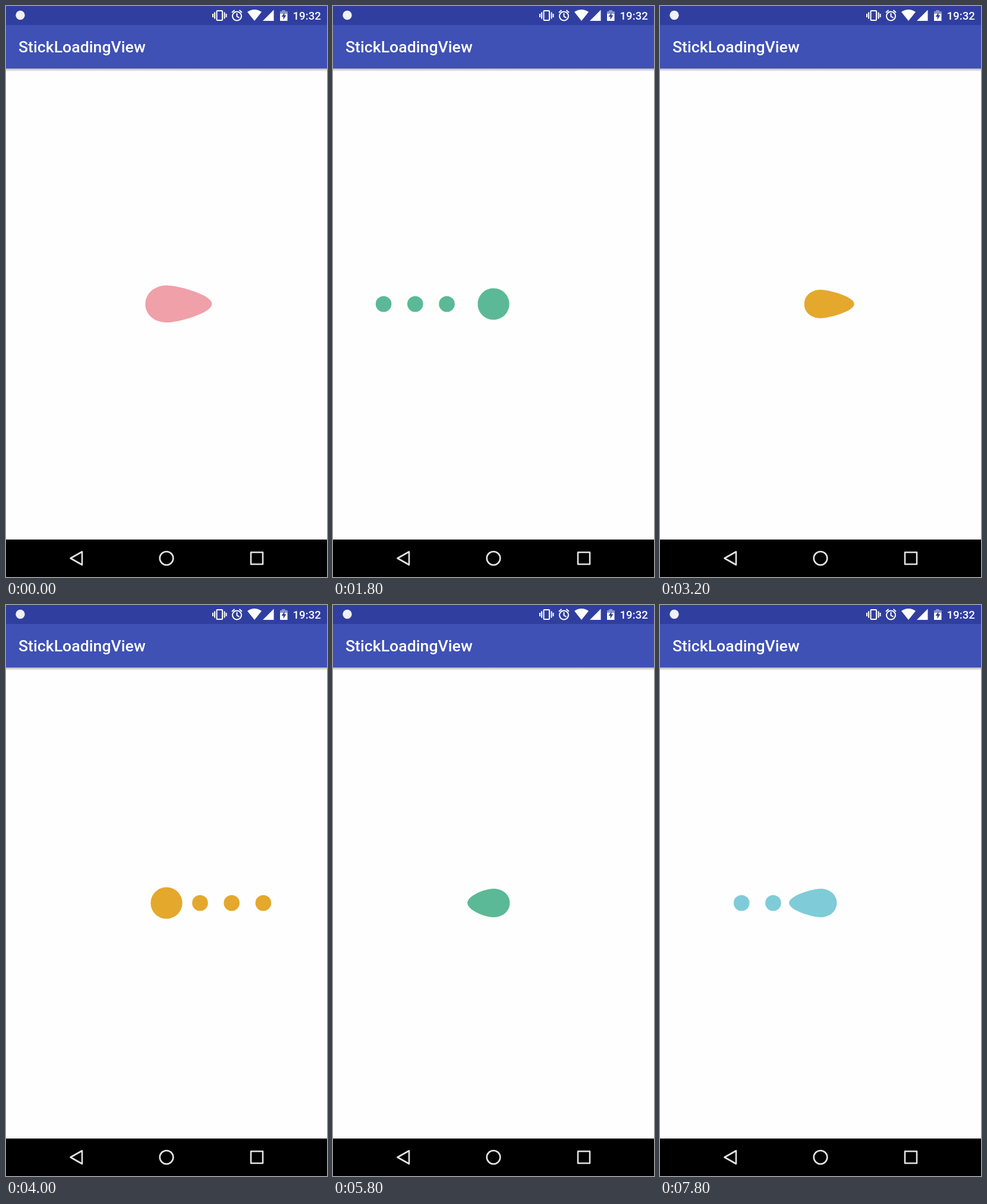
Write an HTML page that moves like this. It is 540x960 px and loops after 8000 ms.

```html
<!DOCTYPE html>
<html lang="en">
<head>
<meta charset="utf-8">
<title>StickLoadingView</title>
<style>
  html, body { margin: 0; width: 100%; height: 100%; overflow: hidden; background: #fefefe; }
  svg { display: block; width: 100%; height: 100%; }
  text { font-family: Roboto, sans-serif; font-weight: 500; fill: #fff; }
</style>
</head>
<body>
<svg viewBox="0 0 540 960">
  <defs>
    <linearGradient id="shade" x2="0" y2="1">
      <stop stop-color="#000" stop-opacity=".3"/>
      <stop offset="1" stop-color="#000" stop-opacity="0"/>
    </linearGradient>
  </defs>
  <rect width="540" height="960" fill="#fefefe"/>
  <rect y="105" width="540" height="5" fill="url(#shade)"/>
  <rect width="540" height="105" fill="#3f51b5"/>
  <rect width="540" height="32" fill="#303f9f"/>
  <text x="21" y="78" font-size="26.67">StickLoadingView</text>

  <!-- status bar -->
  <circle cx="24" cy="15.5" r="7.7" fill="#f0f0f5"/>
  <g fill="none" stroke="#fff" stroke-width="2">
    <rect x="354.5" y="8" width="9.5" height="16" rx="1"/>
    <path d="M351 10.500v11M348 13v6M367.500 10.500v11M370.500 13v6"/>
    <circle cx="388.500" cy="17" r="7.500"/>
    <path d="M388.500 12v5.500l4 2.300M380 11l4.500-4M397 11l-4.500-4"/>
  </g>
  <path d="M406 10Q418 2 430 10L418 25ZM432 25L450.500 6.500V25Z" fill="#fff"/>
  <path d="M461 9h3.500V7h5v2h4v16h-12.500Z" fill="#fff"/>
  <path d="M461 9h3.500V7h5v2h4v4h-12.500Z" fill="#303f9f" opacity=".55"/>
  <path d="M468.500 11l-5 7h3v5l5-7.500h-3Z" fill="#303f9f"/>
  <text x="482.5" y="22.8" font-size="18.67">19:32</text>

  <!-- navigation bar -->
  <rect y="897" width="540" height="63"/>
  <g fill="none" stroke="#e4e4e4" stroke-width="2.6" stroke-linejoin="round">
    <path d="M108.500 928.500L128 917.500V939.500Z"/>
    <circle cx="270" cy="928.500" r="11.300"/>
    <rect x="412" y="918.500" width="20" height="20"/>
  </g>

  <g id="loader">
    <path id="blob"/>
    <circle class="dot" r="13.3"/>
    <circle class="dot" r="13.3"/>
    <circle class="dot" r="13.3"/>
  </g>
</svg>
<script>
const LOOP = 8000, SIDE = 2700, START = 230, TOUCH = 2090;
const BASE = 26.6, GAP = 53.2, GROWTH = 4;
const SIDES = [
  { direction: -1, out: '#5bb998', back: '#7fcbd8' },
  { direction: 1, out: '#e4a82c', back: '#f0a0a8' }
];
// Distance of the leading dot from the centre, as [ms, px].
const TRAVEL = [[0, 0], [270, 30], [970, 150], [1450, 188], [2070, 145.5],
                [2170, 133], [2470, 50], [2700, 0]];

const loader = document.getElementById('loader');
const blob = document.getElementById('blob');
const dots = [...document.querySelectorAll('.dot')];
const clamp = v => Math.max(0, Math.min(1, v));

function slope(i) {
  const a = TRAVEL[Math.max(0, i - 1)], b = TRAVEL[Math.min(TRAVEL.length - 1, i + 1)];
  return (b[1] - a[1]) / (b[0] - a[0]);
}

function travel(time) {
  let i = 0;
  while (i < TRAVEL.length - 2 && time > TRAVEL[i + 1][0]) i++;
  const [t0, a] = TRAVEL[i], [t1, b] = TRAVEL[i + 1];
  const span = t1 - t0, u = (time - t0) / span, v = 1 - u;
  return a * (1 + 2 * u) * v * v + b * u * u * (3 - 2 * u)
    + span * u * v * (v * slope(i) - u * slope(i + 1));
}

// A circle of radius r whose right end is drawn out to x = tip.
function dropPath(r, tip) {
  const pull = clamp((tip - r) / 12);
  const top = r * (1 - 0.1 * pull), rear = r * (1 + 0.03 * pull);
  const handle = r * 0.552, nose = r * (0.552 - 0.1 * pull);
  return `M0 ${-top}C${handle} ${-top} ${tip} ${-nose} ${tip} 0
    C${tip} ${nose} ${handle} ${top} 0 ${top}
    C${-handle} ${top} ${-rear} ${handle} ${-rear} 0
    C${-rear} ${-handle} ${-handle} ${-top} 0 ${-top}Z`;
}

function draw(now) {
  const time = (now % LOOP - START + 2 * SIDE) % (2 * SIDE);
  const side = SIDES[Math.floor(time / SIDE)];
  const local = time % SIDE;
  const returning = local >= TOUCH;
  const sticky = returning || local < SIDE / 2;
  const lead = travel(local);

  let radius = BASE, tip = 0;
  if (!returning) radius += 3 * GROWTH * (1 - clamp(local / 150));
  dots.forEach((dot, i) => {
    const x = lead - i * GAP;
    const attached = sticky && x > 0 && x <= GAP;
    if (attached) tip = x + BASE;
    if (returning) radius += GROWTH * clamp(1 - x / 12);
    dot.setAttribute('cx', x);
    dot.style.display = x > 0 && !attached ? '' : 'none';
  });

  blob.setAttribute('d', dropPath(radius, Math.max(radius, tip)));
  loader.setAttribute('fill', returning ? side.back : side.out);
  loader.setAttribute('transform', `translate(270 501) scale(${side.direction} 1)`);
}

const begin = performance.now();
function tick() {
  draw(performance.now() - begin);
  requestAnimationFrame(tick);
}
tick();
</script>
</body>
</html>
```
